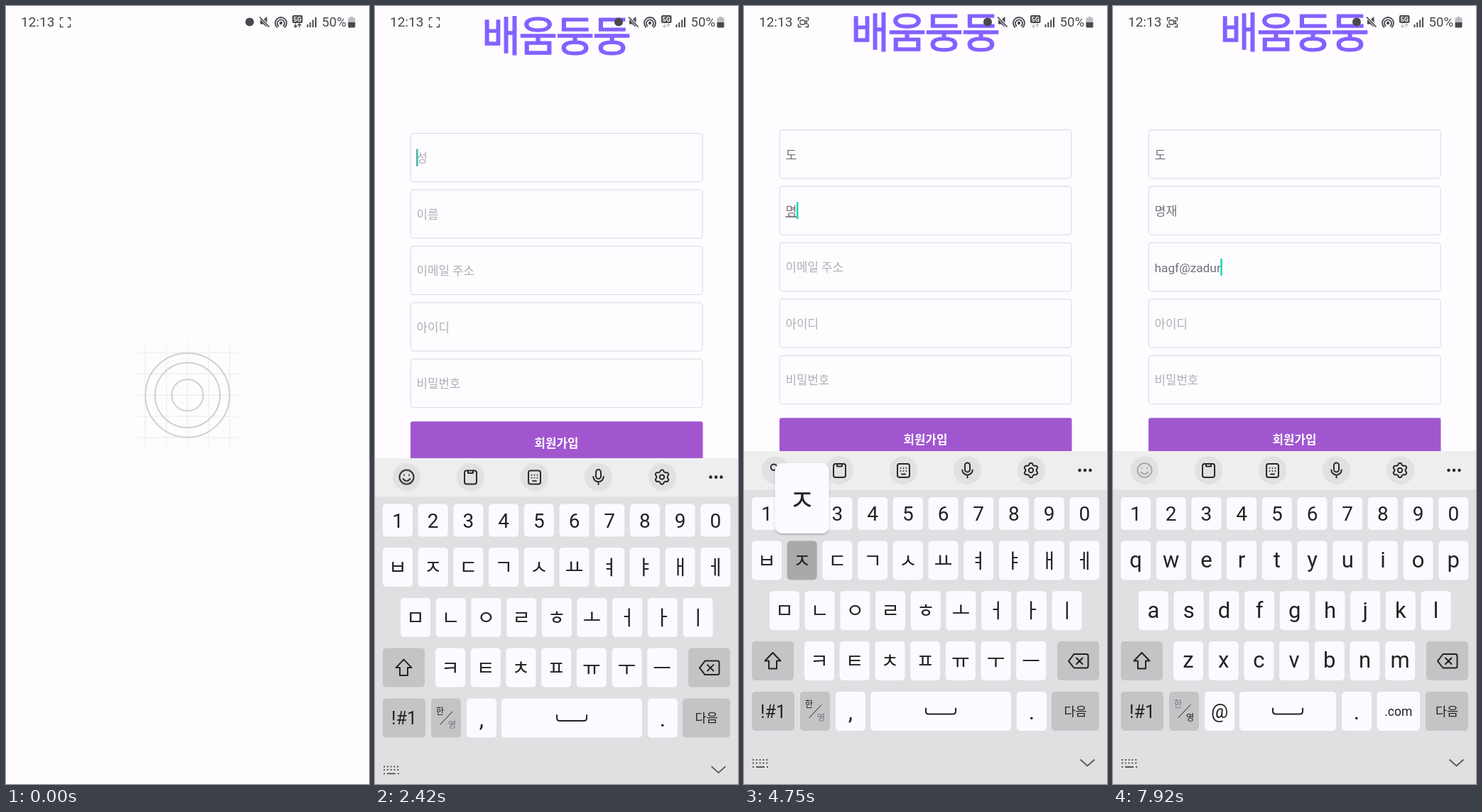
Recreate the animation shown at these times as an HTML page. Size 511 px wide and 1096 px high, loop 8 s.

```html
<!DOCTYPE html>
<html lang="ko">
<head>
<meta charset="utf-8">
<title>Sign-up</title>
<style>
html, body { margin: 0; width: 100%; height: 100%; overflow: hidden; background: #fefcff; }
svg { display: block; width: 100%; height: 100%; font-family: Roboto, "Noto Sans CJK KR", "Noto Sans CJK", sans-serif; }
.mid { text-anchor: middle; }
.line { fill: none; stroke-linecap: round; stroke-linejoin: round; }
.title { font: 400 59px "Noto Sans CJK KR", "Noto Sans CJK", sans-serif; letter-spacing: -2.3px; fill: #8460ff; stroke: #8460ff; stroke-width: 1.3; stroke-linejoin: round; }
.bold { font-size: 16.8px; font-weight: 700; }
.hint { font-size: 16.8px; fill: #b1aeb4; }
.value { font-size: 17.3px; fill: #757278; }
.screen { transform-origin: 255.5px 548px; }

#splash { animation: splash 8s linear infinite; }
#login { animation: login 8s linear infinite, grow 8s infinite; }
#press { animation: press 8s linear infinite; }
#pressText { animation: press 8s linear infinite; }
#form { animation: form 8s linear infinite, arrive 8s infinite; }
#pan { animation: pan 8s infinite; }
#keyboard { animation: keyboard 8s infinite; }
#rec { animation: rec 1s step-end infinite; }
#data { animation: data 8s step-end infinite; }
#smile { animation: smile 8s step-end infinite; }
#lens { animation: lens 8s linear infinite; }
#handle { stroke-dasharray: 10 30; animation: handle 8s linear infinite; }

@keyframes splash { 0%, .6% { opacity: 1 } 4.2%, 100% { opacity: 0 } }
@keyframes login { 0%, .6% { opacity: 0 } 4.2%, 19.2% { opacity: 1 } 20.8%, 100% { opacity: 0 } }
@keyframes grow {
  0% { transform: none }
  18.75% { transform: none; animation-timing-function: cubic-bezier(.2, .3, .1, 1) }
  23.1%, 100% { transform: scale(1.15) }
}
@keyframes press { 0%, 15.4% { opacity: 1 } 17.3%, 100% { opacity: .2 } }
@keyframes form { 0%, 19.2% { opacity: 0 } 20.8%, 100% { opacity: 1 } }
@keyframes arrive {
  0% { transform: scale(.85) }
  18.75% { transform: scale(.85); animation-timing-function: cubic-bezier(.2, .3, .1, 1) }
  23.1%, 100% { transform: none }
}
@keyframes pan {
  0% { transform: none }
  27.5% { transform: none; animation-timing-function: cubic-bezier(.2, .5, .2, 1) }
  31.2%, 100% { transform: translateY(-240px) }
}
@keyframes keyboard {
  0% { transform: translateY(470px) }
  27.5% { transform: translateY(470px); animation-timing-function: cubic-bezier(.2, .5, .2, 1) }
  31.2%, 100% { transform: none }
}
@keyframes rec { 0% { opacity: 0 } 50% { opacity: 1 } }
@keyframes data {
  0% { opacity: 1 } 21.8% { opacity: .35 } 33.3% { opacity: 1 }
  55.1% { opacity: .35 } 85.3% { opacity: 1 } 90.6% { opacity: .35 }
}
@keyframes smile { 0% { opacity: 1 } 37.5% { opacity: 0 } 66.6% { opacity: .3 } }
@keyframes lens { 0%, 37.5% { opacity: 0 } 39%, 66.59% { opacity: 1 } 66.6%, 100% { opacity: 0 } }
@keyframes handle { 0%, 40% { stroke-dashoffset: 11 } 43.7%, 100% { stroke-dashoffset: 0 } }
</style>
</head>
<body>
<svg id="stage" viewBox="0 0 511 1096">
  <defs>
    <linearGradient id="fadeX" gradientUnits="userSpaceOnUse" x1="168" y1="0" x2="343" y2="0">
      <stop offset="0" stop-color="#efeef1" stop-opacity="0"/><stop offset=".2" stop-color="#efeef1"/>
      <stop offset=".8" stop-color="#efeef1"/><stop offset="1" stop-color="#efeef1" stop-opacity="0"/>
    </linearGradient>
    <linearGradient id="fadeY" gradientUnits="userSpaceOnUse" x1="0" y1="461" x2="0" y2="636">
      <stop offset="0" stop-color="#efeef1" stop-opacity="0"/><stop offset=".2" stop-color="#efeef1"/>
      <stop offset=".8" stop-color="#efeef1"/><stop offset="1" stop-color="#efeef1" stop-opacity="0"/>
    </linearGradient>
    <filter id="shadow" x="-20%" y="-20%" width="140%" height="140%">
      <feDropShadow dx="0" dy="1.5" stdDeviation="1.8" flood-color="#000" flood-opacity=".25"/>
    </filter>
  </defs>
  <rect width="511" height="1096" fill="#fefcff"/>

  <g id="splash">
    <path fill="none" stroke="url(#fadeX)" stroke-width="1.4" d="M168 488.5h175M168 518.3h175M168 548.2h175M168 578h175M168 607.8h175"/>
    <path fill="none" stroke="url(#fadeY)" stroke-width="1.4" d="M196 461v175M225.7 461v175M255.5 461v175M285.3 461v175M315 461v175"/>
    <g fill="none" stroke="#d0cfd2" stroke-width="2">
      <circle cx="255.5" cy="548.2" r="59.3"/><circle cx="255.5" cy="548.2" r="45.7"/><circle cx="255.5" cy="548.2" r="22.2"/>
    </g>
  </g>

  <g id="login" class="screen">
    <text class="title mid" x="254.5" y="478.5">배움둥둥</text>
    <g id="press">
      <rect x="50" y="593" width="411.5" height="61" rx="3" fill="#a156d0"/>
      <text id="pressText" class="bold mid" x="255.5" y="630" fill="#fff">회원가입</text>
    </g>
    <text class="bold mid" x="255.5" y="697" fill="#a04fd0">로그인</text>
  </g>

  <g id="form" class="screen">
    <g id="pan">
      <text class="title mid" x="254.5" y="299">배움둥둥</text>
      <g id="fields"></g>
      <rect x="50" y="820.3" width="411.5" height="60.7" rx="3" fill="#a156d0"/>
      <text class="bold mid" x="255.5" y="857" fill="#fff">회원가입</text>
      <rect id="cursor" width="2.6" height="24"/>
    </g>
  </g>

  <g id="status" fill="#4a484c">
    <text x="21" y="29" font-size="19">12:13</text>
    <path class="line" stroke="#4a484c" stroke-width="1.5" d="M76.500 20v-3.500h3.500M87 16.500h3.500v3.500M90.500 26v3.500h-3.500M80 29.500h-3.500v-3.500"/>
    <g id="rec" class="line" stroke="#4a484c" stroke-width="1.3">
      <rect x="79" y="20" width="6.500" height="6" rx="1.200"/><path d="M85.500 22.500l3-2v5l-3-2"/>
    </g>
    <circle cx="343" cy="22.500" r="6"/>
    <path d="M358 19.500h4l5.500-4.500v15l-5.500-4.500h-4z"/>
    <path d="M357 15l14 15" stroke="#fefcff" stroke-width="3.600"/>
    <path d="M357 15.500l13.500 14" stroke="#4a484c" stroke-width="1.800"/>
    <circle cx="387" cy="24" r="2.200"/>
    <path class="line" stroke="#4a484c" stroke-width="1.800" d="M383.500 28a5 5 0 1 1 7 0M381.500 29.800a8 8 0 1 1 11 0"/>
    <rect x="403" y="13" width="14.500" height="11" rx="2"/>
    <text class="mid" x="410.200" y="21.800" font-size="9" font-weight="700" fill="#fff">5G</text>
    <path id="data" class="line" stroke="#4a484c" stroke-width="1.300" d="M407.500 25v5M405.500 28l2 2 2-2M413 30v-5M411 27l2-2 2 2"/>
    <path d="M423.500 26h2v4h-2zM427.300 23h2v7h-2zM431.200 19.500h2v10.500h-2zM435 16h2v14h-2z"/>
    <text x="444.500" y="29" font-size="18.600">50%</text>
    <path fill="#bdbbbf" d="M484.500 15h4v1.500h2q1 0 1 1v6h-10v-6q0-1 1-1h2z"/>
    <path d="M481.500 23h10v6q0 1.500-1.500 1.500h-7q-1.500 0-1.500-1.500z"/>
  </g>

  <g id="keyboard">
    <rect y="627" width="511" height="470" fill="#e0dfe1"/>
    <rect y="627" width="511" height="54.500" fill="#efeeef"/>
    <g id="discs" fill="#e1e0e2"></g>
    <g class="line" stroke="#2a292b" stroke-width="2">
      <g id="smile">
        <circle cx="44.500" cy="654" r="10"/><path d="M39.500 656.500q5 6 10 0M41 651v.3M48 651v.3"/>
      </g>
      <g id="lens"><circle cx="42" cy="649.700" r="4.200"/><path id="handle" d="M45.200 652.900l6.500 6.500"/></g>
      <rect x="126" y="645" width="17" height="19" rx="3"/><path d="M131 645v3.500h7v-3.500"/>
      <rect x="216" y="645" width="17" height="19" rx="3"/>
      <path stroke-width="1.800" d="M220.500 651v.1M224.500 651v.1M228.500 651v.1M220.500 655v.1M224.500 655v.1M228.500 655v.1M222 659.500h5"/>
      <rect x="311" y="643.500" width="7" height="13" rx="3.500"/><path d="M307.300 653.500a7.200 7.200 0 0 0 14.400 0M314.500 661v3.500"/>
      <circle cx="404" cy="654" r="3.200"/><path id="gear"/>
      <path stroke-width="4.500" d="M472.500 654v.1M480 654v.1M487.500 654v.1"/>
      <path stroke="#555" stroke-width="1.700" d="M474 1062l9.500 8.500 9.500-8.500"/>
      <path stroke="#555" stroke-width="2" stroke-linecap="butt" stroke-dasharray="2 2.800" d="M12 1062h22M12 1066.500h22"/>
      <path stroke="#555" stroke-width="2" stroke-linecap="butt" d="M12 1072h2M17 1072h12M32 1072h2"/>
    </g>
    <g id="korean"></g>
    <g id="latin"></g>
    <g id="popup">
      <rect width="76" height="99" rx="10" fill="#fcfaff" filter="url(#shadow)"/>
      <text class="mid" x="38" fill="#222"></text>
    </g>
  </g>
</svg>
<script>
const LOOP = 8000, HOLD = 80, LINGER = 165, PITCH = 49.7, FIELD_GAP = 79.5;
const $ = id => document.getElementById(id);

function add(parent, tag, attrs, text) {
  const node = document.createElementNS('http://www.w3.org/2000/svg', tag);
  for (const name in attrs) node.setAttribute(name, attrs[name]);
  if (text) node.textContent = text;
  parent.append(node);
  return node;
}
const show = (node, on) => { node.style.display = on ? '' : 'none'; };

// Form fields
const fields = ['성', '이름', '이메일 주소', '아이디', '비밀번호'].map((hint, i) => {
  const y = 414.5 + i * FIELD_GAP;
  add($('fields'), 'rect', { x: 50.3, y, width: 410.7, height: 68.3, rx: 4, fill: 'none', stroke: '#e2e0e8', 'stroke-width': 1.3 });
  return {
    hint: add($('fields'), 'text', { class: 'hint', x: 58.5, y: y + 40.8 }, hint),
    value: add($('fields'), 'text', { class: 'value', x: 58.5, y: y + 41 })
  };
});

// Toolbar
for (let i = 0; i < 5; i++) add($('discs'), 'circle', { cx: 44.5 + i * 90, cy: 654, r: 19.7 });
const gear = Array.from({ length: 72 }, (_, i) => {
  const a = i * Math.PI / 36, r = 8.9 + 1.2 * Math.tanh(2 * Math.cos(6 * a));
  return (404 + r * Math.sin(a)).toFixed(1) + ' ' + (654 - r * Math.cos(a)).toFixed(1);
});
$('gear').setAttribute('d', 'M' + gear.join('L') + 'Z');

// Keys
const WHITE = '#fcfaff', GREY = '#c4c3c6', DOWN = '#a9a8aa';

function makeBoard(root, rows, latin) {
  const keys = {};
  const key = (label, x, y, w, size, fill = WHITE, h = 55, drop = .36) => {
    const rect = add(root, 'rect', { x, y, width: w, height: h, rx: 5, fill });
    if (size) add(root, 'text', { class: 'mid', x: x + w / 2, y: y + h / 2 + size * drop, 'font-size': size, fill: '#222' }, label);
    keys[label] = { rect, x: x + w / 2, y, fill };
  };
  const stroke = (d, width = 2) => add(root, 'path', { class: 'line', stroke: '#222', 'stroke-width': width, d });
  const row = (chars, x, y, size, h, drop) =>
    [...chars].forEach((c, i) => key(c, x + i * PITCH, y, 42, size, WHITE, h, drop));

  row('1234567890', 11, 692, 28, 46);
  const size = latin ? 31 : 28, drop = latin ? .32 : .38;
  row(rows[0], 11, 753.5, size, 55, drop);
  row(rows[1], 36, 824.3, size, 55, drop);
  row(rows[2], 85, 895, size, 55, drop);

  key('shift', 11, 895, 59, 0, GREY);
  stroke('M40.500 911l11 11.500h-5.500v11h-11v-11h-5.500z');
  key('back', 441, 895, 59, 0, GREY);
  stroke('M464.500 913h17.500q2.500 0 2.500 2.500v14.500q0 2.500-2.500 2.500h-17.500l-7.500-9.700zM468 918.500l8.500 8.500m0-8.500l-8.500 8.500');

  key('!#1', 11, 966, 60, 25, GREY);
  key('lang', 79, 966, 42, 0, GREY);
  const ink = on => on ? '#222' : '#77757a';
  add(root, 'text', { class: 'mid', x: 91.5, y: 988, 'font-size': 12.5, fill: ink(!latin) }, '한');
  add(root, 'text', { class: 'mid', x: 108.5, y: 1007, 'font-size': 12.5, fill: ink(latin) }, '영');
  stroke('M92 1002.500l17-18', 1);

  key(latin ? '@' : ',', 129, 966, 42, latin ? 27 : 32);
  const spaceW = latin ? 136 : 198, mid = 178 + spaceW / 2;
  key('space', 178, 966, spaceW, 0);
  stroke(`M${mid - 21} 989.500v4q0 4 4 4h34q4 0 4-4v-4`);
  key('.', latin ? 322 : 384, 966, 42, 32);
  if (latin) key('.com', 371.5, 966, 60.5, 17.5);
  key('다음', latin ? 440 : 433, 966, latin ? 60 : 67, 17.5, GREY);
  return keys;
}
const korean = makeBoard($('korean'), ['ㅂㅈㄷㄱㅅㅛㅕㅑㅐㅔ', 'ㅁㄴㅇㄹㅎㅗㅓㅏㅣ', 'ㅋㅌㅊㅍㅠㅜㅡ'], false);
const latin = makeBoard($('latin'), ['qwertyuiop', 'asdfghjkl', 'zxcvbnm'], true);

// Each tap: time, key, field, text once the key is released
const taps = [
  [3740, 'ㄷ', 0, 'ㄷ'], [3900, 'ㅗ', 0, '도'], [4060, '다음'],
  [4320, 'ㅁ', 1, 'ㅁ'], [4450, 'ㅕ', 1, '며'], [4590, 'ㅇ', 1, '명'],
  [4720, 'ㅈ', 1, '명ㅈ'], [4880, 'ㅐ', 1, '명재'], [5165, '다음']
];
const mail = 'hagf@zadur';
[5910, 6130, 6350, 6575, 6825, 7160, 7310, 7460, 7600, 7740]
  .forEach((time, i) => taps.push([time, mail[i], 2, mail.slice(0, i + 1)]));

const [bubble, bubbleText] = $('popup').children;
let lit = null;

function render(t) {
  const isLatin = t >= 5330, keys = isLatin ? latin : korean;
  const focus = t < 4140 ? 0 : t < 5245 ? 1 : 2;
  show($('korean'), !isLatin);
  show($('latin'), isLatin);

  const texts = ['', '', '', '', ''];
  let last = null;
  for (const tap of taps) {
    if (tap[0] > t) break;
    last = tap;
    if (tap[3] && t >= tap[0] + HOLD) texts[tap[2]] = tap[3];
  }
  fields.forEach(({ hint, value }, i) => {
    if (value.textContent !== texts[i]) value.textContent = texts[i];
    value.style.textDecoration = i === focus && !isLatin ? 'underline' : '';
    show(hint, !texts[i]);
  });

  if (lit) lit.rect.setAttribute('fill', lit.fill);
  const age = last ? t - last[0] : Infinity;
  lit = age < HOLD ? keys[last[1]] : null;
  if (lit) lit.rect.setAttribute('fill', DOWN);

  const popping = age < LINGER && last[1] !== '다음';
  show($('popup'), popping);
  if (popping) {
    const { x, y } = keys[last[1]];
    $('popup').setAttribute('transform', `translate(${Math.max(6, x - 38)} ${y - 109.5})`);
    bubbleText.textContent = last[1];
    bubbleText.setAttribute('font-size', isLatin ? 45 : 41);
    bubbleText.setAttribute('y', isLatin ? 66 : 67);
  }

  const cursor = $('cursor'), filled = texts[focus];
  show(cursor, t >= 2165 && !(t >= 2665 && t < 3165));
  cursor.setAttribute('x', 58 + (filled ? fields[focus].value.getComputedTextLength() : 0));
  cursor.setAttribute('y', 436.7 + focus * FIELD_GAP);
  cursor.setAttribute('fill', filled ? '#1fd8bd' : '#46b5a8');
}

let start = null;
function tick(now) {
  if (start === null) start = now;
  render((now - start) % LOOP);
  requestAnimationFrame(tick);
}
render(0);
requestAnimationFrame(tick);
</script>
</body>
</html>
```
